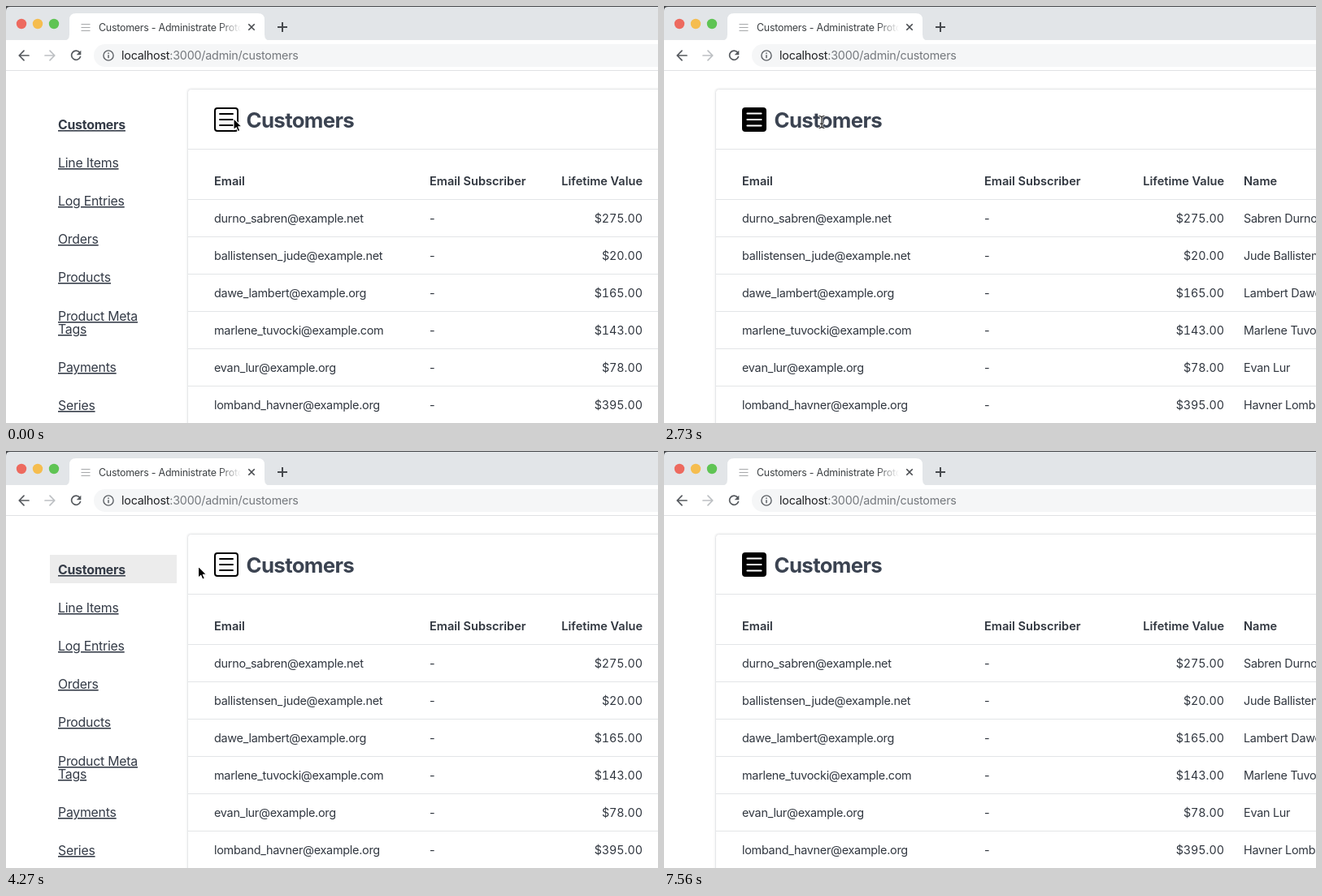
An HTML page that plays this animation: 802 by 514 pixels, repeating every 7840 ms.

```html
<!DOCTYPE html>
<html lang="en">
<head>
<meta charset="utf-8">
<title>Customers</title>
<style>
  html, body { margin: 0; width: 100%; height: 100%; overflow: hidden; background: #fff; }
  svg { display: block; width: 802px; height: 514px; font-family: Inter, "Open Sans", sans-serif; }
  text { fill: #30363f; white-space: pre; }
  .title { font-size: 12.4px; letter-spacing: -.22px; }
  .url { font-size: 14.3px; letter-spacing: -.2px; }
  .link { font-size: 15.8px; letter-spacing: -.21px; fill: #343b47; text-decoration: underline; text-decoration-thickness: 1px; text-underline-offset: 2px; }
  .link.on { font-weight: 700; }
  .h1 { font-size: 25.8px; letter-spacing: -.65px; font-weight: 700; fill: #3b4351; }
  .th { font-size: 14.55px; font-weight: 600; }
  .td { font-size: 14.4px; letter-spacing: -.27px; }
  .money { font-size: 14.3px; font-variant-numeric: tabular-nums; }
  .end { text-anchor: end; }
  .line { fill: none; stroke-linecap: round; stroke-linejoin: round; }
</style>
</head>
<body>
<svg id="stage" viewBox="0 0 802 514" xmlns="http://www.w3.org/2000/svg">
  <defs>
    <linearGradient id="fade" gradientUnits="userSpaceOnUse" x1="262" y1="0" x2="289" y2="0">
      <stop stop-color="#3c4043"/><stop offset="1" stop-color="#3c4043" stop-opacity="0"/>
    </linearGradient>
  </defs>
  <rect width="802" height="514" fill="#fff"/>

  <g id="page">
    <g id="nav"><rect id="hover" x="54" y="128" width="156" height="35" fill="#ececec"/></g>
    <g id="card"></g>
  </g>

  <g id="browser">
    <rect width="802" height="10" fill="#46484b"/>
    <path d="M0 43V6Q0 1 5 1H802V43Z" fill="#e2e5e8"/>
    <rect y="42" width="802" height="38" fill="#fff"/>
    <path d="M70 43Q78 43 78 35V17Q78 9 86 9H310Q318 9 318 17V35Q318 43 326 43Z" fill="#fff"/>
    <rect y="79" width="802" height="1" fill="#e0e2e4"/>
    <circle cx="19" cy="22" r="6.2" fill="#ed6a5f"/>
    <circle cx="39" cy="22" r="6.2" fill="#f5bd4f"/>
    <circle cx="59" cy="22" r="6.2" fill="#5fc454"/>
    <path d="M92.5 22.5h11M92.5 26.5h11M92.5 30.5h11" stroke="#a6a8aa" stroke-width="1.1"/>
    <text class="title" x="114" y="30.5" style="fill:url(#fade)">Customers - Administrate Prototype</text>
    <path d="M298.3 22.3l7.4 7.4m0-7.4l-7.4 7.4" stroke="#46494d" stroke-width="1.6"/>
    <path d="M334 26h12M340 20v12" stroke="#46494d" stroke-width="2"/>
    <path class="line" d="M28 61H16.5M22 55.2L16.2 61L22 66.8" stroke="#55595e" stroke-width="1.7"/>
    <path class="line" d="M48 61H59.5M54 55.2L59.8 61L54 66.8" stroke="#bdc0c3" stroke-width="1.7"/>
    <path class="line" d="M90.6 57.3A5.6 5.6 0 1 0 91.5 62.5" stroke="#55595e" stroke-width="1.7"/>
    <path d="M92.3 54.7V60.3H86.7Z" fill="#55595e"/>
    <path d="M802 47H122a14 14 0 0 0 0 28H802Z" fill="#f5f6f7"/>
    <circle cx="126" cy="61" r="6.1" fill="none" stroke="#5f6368" stroke-width="1.4"/>
    <path d="M126 60.2v4.1M126 57.4v1.5" stroke="#5f6368" stroke-width="1.5"/>
    <text class="url" x="142" y="66"><tspan fill="#202124">localhost</tspan><tspan fill="#74787d">:3000/admin/customers</tspan></text>
  </g>

  <g id="pointer">
    <path id="arrow" d="M0 0V14.2L3.2 11.3L5.3 16.2L7.8 15.1L5.8 10.3H10.2Z" fill="#000" stroke="#fff" stroke-width="1.1" stroke-linejoin="round"/>
    <path id="hand" d="M-1.6 1.5C-1.9 -.4 .8 -.6 1.2 1.2L2.2 5.3C2.6 4.3 4.3 4.4 4.6 5.6C5.2 4.8 6.7 5.1 7 6.3C7.7 5.8 8.9 6.3 9.1 7.6C9.6 10 9.4 11.4 8.3 13.2V16H1.4C.6 13.8 -1.5 12.5 -3 10.6C-4.2 9.3 -5.3 8.1 -4.3 7.2C-3.3 6.4 -1.9 7.6 -.4 8.8Z" fill="#fff" stroke="#111" stroke-width="1.1" stroke-linejoin="round"/>
    <g id="beam" class="line">
      <path d="M-3 -7.3Q-.5 -7.3 0 -5.8Q.5 -7.3 3 -7.3M0 -5.8V5.8M-3 7.3Q-.5 7.3 0 5.8Q.5 7.3 3 7.3M-1.7 2.2H1.7" stroke="#fff" stroke-width="2.6"/>
      <path d="M-3 -7.3Q-.5 -7.3 0 -5.8Q.5 -7.3 3 -7.3M0 -5.8V5.8M-3 7.3Q-.5 7.3 0 5.8Q.5 7.3 3 7.3M-1.7 2.2H1.7" stroke="#222" stroke-width="1.2"/>
    </g>
  </g>
</svg>
<script>
const LOOP = 7840, STEP = 70;
const $ = id => document.getElementById(id);

function add(parent, tag, attrs, text) {
  const el = document.createElementNS("http://www.w3.org/2000/svg", tag);
  for (const k in attrs) el.setAttribute(k, attrs[k]);
  if (text) el.textContent = text;
  parent.appendChild(el);
  return el;
}
const label = (parent, cls, x, y, text) => add(parent, "text", { class: cls, x, y }, text);
const show = (el, on) => el.setAttribute("display", on ? "inline" : "none");

const links = [
  ["Customers", 152], ["Line Items", 199], ["Log Entries", 246], ["Orders", 293],
  ["Products", 340], ["Product Meta", 388], ["Tags", 404], ["Payments", 451], ["Series", 498]
];
links.forEach(([text, y], i) => label($("nav"), i ? "link" : "link on", 64, y, text));

const customers = [
  ["durno_sabren@example.net", "$275.00", "Sabren Durno"],
  ["ballistensen_jude@example.net", "$20.00", "Jude Ballistensen"],
  ["dawe_lambert@example.org", "$165.00", "Lambert Dawe"],
  ["marlene_tuvocki@example.com", "$143.00", "Marlene Tuvocki"],
  ["evan_lur@example.org", "$78.00", "Evan Lur"],
  ["lomband_havner@example.org", "$395.00", "Havner Lomband"]
];

// One card layout per sidebar state; left is the card edge.
function buildCard(left, sub, value, name, filled) {
  const g = add($("card"), "g", {}), x = left + 33;
  add(g, "rect", { x: left - .5, y: 101.5, width: 900, height: 500, rx: 5, fill: "none", stroke: "#f7f8f8", "stroke-width": 2 });
  add(g, "rect", { x: left + .5, y: 102.5, width: 900, height: 500, rx: 4, fill: "#fff", stroke: "#e6e7e9" });
  for (const y of [176, 238, 284, 330, 376, 422, 468])
    add(g, "rect", { x: left + 1, y, width: 802 - left, height: 1, fill: "#e3e5e7" });

  add(g, "rect", { x: x + 1, y: 126, width: 28, height: 28, rx: 3, fill: filled ? "#000" : "#fff", stroke: "#000", "stroke-width": 2 });
  const d = filled
    ? `M${x + 6.5} 132.5h17M${x + 6.5} 140h17M${x + 6.5} 147.5h17`
    : `M${x + 7} 133h16M${x + 7} 140h16M${x + 7} 147h16`;
  add(g, "path", { class: "line", d, stroke: filled ? "#fff" : "#000", "stroke-width": filled ? 2.2 : 1.9 });
  label(g, "h1", x + 39.5, 150, "Customers");

  label(g, "th", x, 221, "Email");
  label(g, "th", sub, 221, "Email Subscriber");
  label(g, "th end", value, 221, "Lifetime Value");
  label(g, "th", name, 221, "Name");
  customers.forEach(([email, money, person], i) => {
    const y = 267 + 46 * i;
    label(g, "td", x, y, email);
    label(g, "td", sub, y, "-");
    label(g, "money end", value, y, money);
    label(g, "td", name, y, person);
  });
  return g;
}
const narrow = buildCard(223, 521, 783, 807, false);
const wide = buildCard(63, 394, 689, 713, true);

// Pointer path: time, x, y
const path = [
  [0, 280, 138.5], [840, 280, 138.5], [910, 278.5, 138.5], [1330, 278.5, 138.5], [1820, 276.5, 139.5],
  [2310, 276.5, 139.5], [2590, 238, 142], [2870, 150, 144], [3080, 118, 144], [3150, 118, 144],
  [3360, 115.3, 144.8], [3710, 115.3, 144.8], [3850, 124, 144], [4270, 236.5, 142], [4410, 260, 144],
  [4550, 267, 145], [5810, 267, 145], [5880, 300, 170], [6090, 735, 490]
];
function pointerAt(t) {
  const i = path.findIndex(p => p[0] > t);
  if (i < 0) return path[path.length - 1].slice(1);
  const [t0, x0, y0] = path[i - 1], [t1, x1, y1] = path[i], k = (t - t0) / (t1 - t0);
  return [x0 + (x1 - x0) * k, y0 + (y1 - y0) * k];
}
function pointerKind(t, x, y, open) {
  if (t < 2000 || y > 160) return "arrow";
  if (open) return x < 210 || x >= 256 ? "hand" : "arrow";
  if (x <= 126) return "hand";
  return x >= 136 && x < 268 ? "beam" : "arrow";
}

function draw(time) {
  const t = Math.floor((time % LOOP) / STEP) * STEP;
  const open = t < 1400 || (t >= 3430 && t < 5460);
  show($("nav"), open);
  show(narrow, open);
  show(wide, !open);
  show($("hover"), t >= 3570 && t < 4340);

  const [x, y] = pointerAt(t), kind = pointerKind(t, x, y, open);
  show($("pointer"), t < 6160);
  $("pointer").setAttribute("transform", `translate(${x} ${y})`);
  for (const id of ["arrow", "hand", "beam"]) show($(id), id === kind);
}

const start = performance.now();
function tick() {
  draw(performance.now() - start);
  requestAnimationFrame(tick);
}
tick();
</script>
</body>
</html>
```
